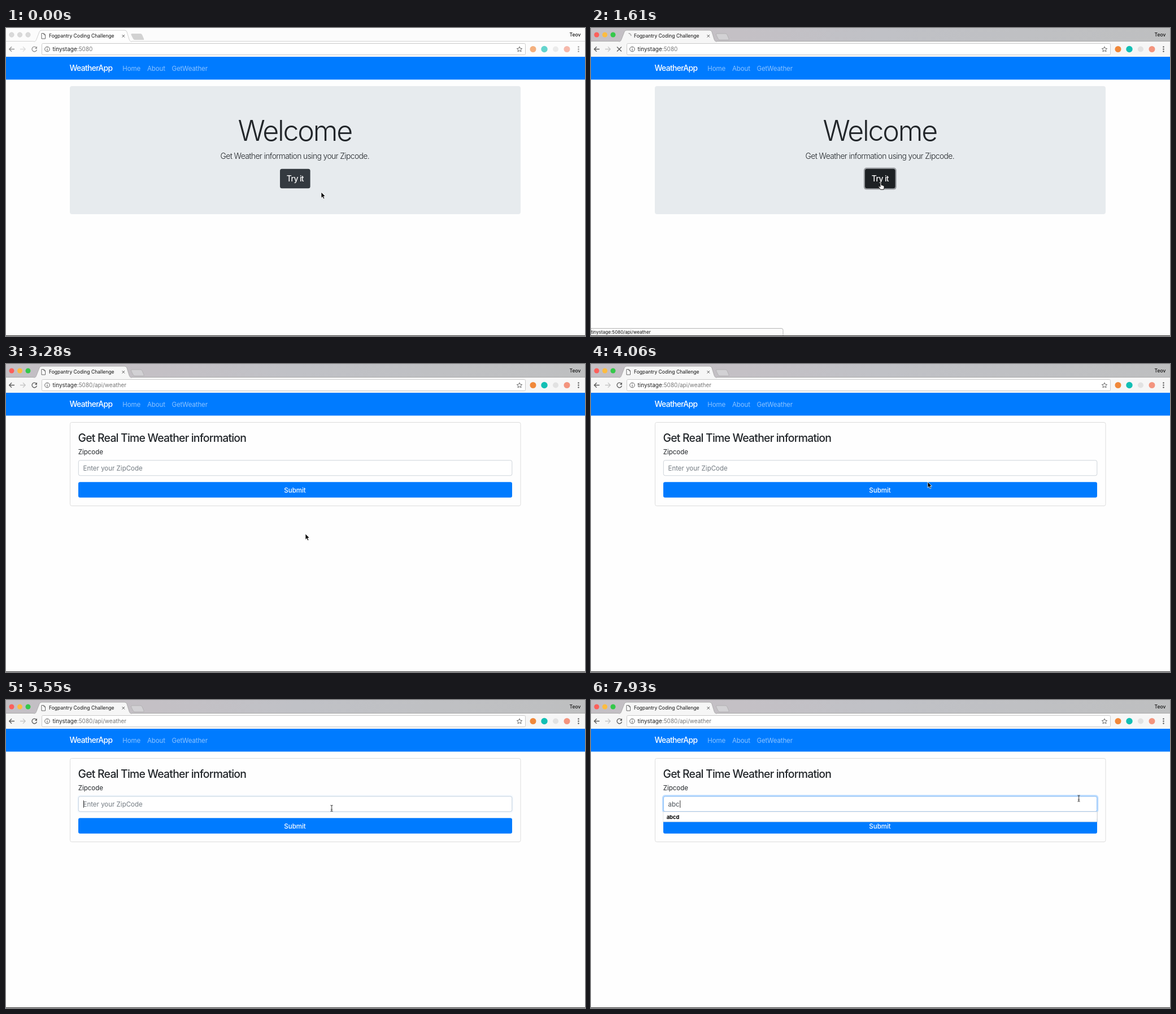
Animation of 1025 by 546 pixels, one loop 8000 ms. Source, as an HTML page:

```html
<!DOCTYPE html>
<html lang="en">
<head>
<meta charset="utf-8">
<title>Weather form demo</title>
<style>
html, body { margin: 0; width: 100%; height: 100%; overflow: hidden; background: #fefefe; }
svg { display: block; width: 100vw; height: 100vh; }
text { font-family: Inter, "Open Sans", sans-serif; font-size: 11.5px; font-optical-sizing: none; fill: #212529; }
.tight { letter-spacing: -.043em; }
.ui { font-size: 8.55px; fill: #111; }
.url { font-size: 10px; fill: #222; }
.dim { fill: #777; }
.nav { fill: #fff; fill-opacity: .55; letter-spacing: -.01em; }
.line { fill: none; stroke: #5a5a5a; stroke-width: 1.3; }

/* Every part follows one 8 s clock with hard steps. */
.s { animation: 8s step-end infinite; }
.idle { animation-name: idle; }
.live { animation-name: live; }
.tools { animation-name: tools; }
.first { animation-name: first; }
.second { animation-name: second; }
.busy { animation-name: busy; }
.calm { animation-name: calm; }
.spin { animation-name: spin; }
.try { animation-name: try; }
.status { animation-name: status; }
.fading { animation-name: fading; }
.badge { animation-name: badge; }
.submit { animation-name: submit; }
.focus { animation-name: focus; }
.hint { animation-name: hint; }
.ka { animation-name: ka; }
.kb { animation-name: kb; }
.kc { animation-name: kc; }
.caret { animation-name: caret; }
.popup { animation-name: popup; }
.menu { animation-name: menu; }
.pointer { animation-name: pointer; }
.arrow { animation-name: arrow; }
.hand { animation-name: hand; }
.beam { animation-name: beam; }

@keyframes idle { 0% { opacity: 1 } 8.125%, 100% { opacity: 0 } }
@keyframes live { 0% { opacity: 0 } 8.125%, 100% { opacity: 1 } }
@keyframes tools { 0% { opacity: .65 } 8.125%, 100% { opacity: 1 } }
@keyframes first { 0% { opacity: 1 } 21.875%, 100% { opacity: 0 } }
@keyframes second { 0% { opacity: 0 } 21.875%, 100% { opacity: 1 } }
@keyframes busy { 0% { opacity: 0 } 17.5% { opacity: 1 } 21.875%, 100% { opacity: 0 } }
@keyframes calm { 0% { opacity: 1 } 17.5% { opacity: 0 } 21.875%, 100% { opacity: 1 } }
@keyframes spin { 0% { transform: rotate(120deg) } 20.125%, 100% { transform: rotate(0deg) } }
@keyframes try { 0% { fill: #343a40 } 8.125% { fill: #23272b } 17.5%, 100% { fill: #1d2124 } }
@keyframes status { 0% { opacity: 0 } 8.125% { opacity: 1 } 21.875%, 100% { opacity: 0 } }
@keyframes fading { 0% { opacity: 0 } 21.875% { opacity: 1 } 23.75%, 100% { opacity: 0 } }
@keyframes badge { 0% { fill: #e2e2e2 } 21.875% { fill: #999 } 23.75%, 100% { fill: #e2e2e2 } }
@keyframes submit { 0% { fill: #007bff } 52.625% { fill: #0069d9 } 54.5%, 100% { fill: #007bff } }
@keyframes focus { 0% { opacity: 0 } 69.375% { opacity: .15 } 71.25%, 100% { opacity: 1 } }
@keyframes hint { 0% { opacity: 1 } 91.625%, 100% { opacity: 0 } }
@keyframes ka { 0% { fill-opacity: 0 } 91.625%, 100% { fill-opacity: 1 } }
@keyframes kb { 0% { fill-opacity: 0 } 93.5%, 100% { fill-opacity: 1 } }
@keyframes kc { 0% { fill-opacity: 0 } 99.125%, 100% { fill-opacity: 1 } }
@keyframes caret {
  0% { opacity: 0; transform: translate(137px, 178px) }
  69.375% { opacity: 1; transform: translate(137px, 178px) }
  76.875% { opacity: 0; transform: translate(137px, 178px) }
  82.375% { opacity: 1; transform: translate(137px, 178px) }
  88% { opacity: 0; transform: translate(137px, 178px) }
  91.625% { opacity: 1; transform: translate(143.5px, 178px) }
  93.5% { opacity: 1; transform: translate(150.5px, 178px) }
  99.125%, 100% { opacity: 1; transform: translate(157.3px, 178px) }
}
@keyframes popup { 0% { opacity: 0 } 91.625%, 100% { opacity: 1 } }
@keyframes menu { 0% { transform: scaleY(3) } 93.5%, 100% { transform: scaleY(1) } }
@keyframes pointer {
  0% { transform: translate(558px, 291px) }
  1.75% { transform: translate(530px, 281px) }
  4.375% { transform: translate(511px, 274px) }
  8.125% { transform: translate(512px, 274px) }
  41% { transform: translate(530px, 301px) }
  42.875% { transform: translate(548px, 317px) }
  44.75% { transform: translate(562px, 316px) }
  46.625% { transform: translate(575px, 298px) }
  48.875% { transform: translate(588px, 254px) }
  50.75% { transform: translate(596px, 209px) }
  52.625% { transform: translate(593px, 201px) }
  54.5% { transform: translate(586px, 194px) }
  56.25% { transform: translate(579px, 192.5px) }
  58.125% { transform: translate(576.5px, 192px) }
  73.125% { transform: translate(660px, 186px) }
  75% { transform: translate(800px, 178px) }
  76.875%, 100% { transform: translate(863.5px, 174.5px) }
}
@keyframes arrow { 0% { opacity: 1 } 8.125% { opacity: 0 } 41% { opacity: 1 } 54.5%, 100% { opacity: 0 } }
@keyframes hand { 0% { opacity: 0 } 8.125% { opacity: 1 } 41%, 100% { opacity: 0 } }
@keyframes beam { 0% { opacity: 0 } 54.5%, 100% { opacity: 1 } }
</style>
</head>
<body>
<svg viewBox="0 0 1025 546" preserveAspectRatio="none">
  <defs>
    <linearGradient id="strip">
      <stop offset="0" stop-color="#c3bfc4"/>
      <stop offset=".25" stop-color="#c4c0c5"/>
      <stop offset=".5" stop-color="#c0c1c6"/>
      <stop offset="1" stop-color="#bebfc0"/>
    </linearGradient>
    <path id="tab" d="M49 24C53 24 53 22 54 20L59 7Q60 4 63 4H210Q213 4 214 7L218 20C219 22 219 24 223 24"/>
    <path id="plus" d="M223 10H238Q240 10 241 12L244 19Q245 21 243 21H228Q226 21 225 19L221.500 12Q221 10 223 10Z"/>
  </defs>

  <rect width="1025" height="546" fill="#fefefe"/>

  <!-- Tab strip -->
  <g class="s idle">
    <rect width="1025" height="51" fill="#fcfcfc"/>
    <path d="M0 23.500H49M223 23.500H1025" stroke="#d5d5d5"/>
    <use href="#tab" fill="#fefefe" stroke="#c4c4c4" stroke-width=".8"/>
    <use href="#plus" fill="#d2d2d2"/>
    <g fill="#dadada" stroke="#cdcdcd" stroke-width=".6">
      <circle cx="10" cy="12" r="4.200"/><circle cx="24.500" cy="12" r="4.200"/><circle cx="39" cy="12" r="4.200"/>
    </g>
  </g>
  <g class="s live">
    <rect width="1025" height="24" fill="url(#strip)"/>
    <rect y="24" width="1025" height="27" fill="#f6f6f6"/>
    <path d="M0 23.500H49M223 23.500H1025" stroke="#aaa"/>
    <use href="#tab" fill="#f6f6f6" stroke="#a3a3a3" stroke-width=".8"/>
    <use href="#plus" fill="#d2d1d4" stroke="#aaa" stroke-width=".7"/>
    <circle cx="10" cy="12" r="4.500" fill="#fc605b"/>
    <circle cx="24.500" cy="12" r="4.500" fill="#fdbc40"/>
    <circle cx="39" cy="12" r="4.500" fill="#34c84a"/>
  </g>
  <path class="s calm" d="M63 9.500H67L69.500 12V19H63ZM67 9.500V12H69.500" fill="#fff" stroke="#555" stroke-width=".9"/>
  <g class="s busy"><g transform="translate(66.500 14)">
    <path class="s spin" d="M0 -4.500A4.500 4.500 0 0 1 4.500 0" fill="none" stroke="#888" stroke-width="1.100"/>
  </g></g>
  <text class="ui" x="76" y="17.300">Fogpantry Coding Challenge</text>
  <path d="M205.500 12L210 16.500M210 12L205.500 16.500" stroke="#555"/>
  <text class="ui" x="997.500" y="15.300" font-weight="500">Teov</text>

  <!-- Toolbar -->
  <g class="s tools">
    <path class="line" d="M15 37.500H6M10 33.200L5.700 37.500L10 41.800"/>
    <path class="line" d="M25 37.500H34M30 33.200L34.300 37.500L30 41.800" opacity=".3"/>
    <g class="s calm">
      <path class="line" d="M53.600 34.700A4.300 4.300 0 1 0 54.500 38.500"/>
      <path d="M55 32.500V36.700H50.800Z" fill="#5a5a5a"/>
    </g>
    <path class="line s busy" d="M46 33.500L54 41.500M54 33.500L46 41.500"/>
  </g>
  <rect x="63.500" y="27.500" width="856" height="20" rx="2" fill="#fff" stroke="#cacaca"/>
  <circle class="line" cx="73" cy="37.500" r="4.300" style="stroke-width:1"/>
  <path d="M73 37V40.200M73 34.800V36" stroke="#5a5a5a" stroke-width="1.100"/>
  <text class="url" x="82.500" y="41.200">tinystage<tspan class="dim">:5080</tspan><tspan class="dim s second-path">/api/weather</tspan></text>
  <path class="line" d="M909 33L910.400 36.100L913.700 36.400L911.200 38.600L912 41.900L909 40.100L906 41.900L906.800 38.600L904.300 36.400L907.600 36.100Z" style="stroke-width:.9"/>
  <g class="s tools">
    <circle cx="933" cy="37.500" r="5.500" fill="#f0883a"/>
    <circle cx="953" cy="37.500" r="5.700" fill="#12bfb4"/>
    <circle class="s badge" cx="973" cy="37.500" r="5"/>
    <circle cx="993" cy="37.500" r="5.500" fill="#f3947e"/>
    <g fill="#5a5a5a">
      <circle cx="1013.500" cy="33.500" r="1.200"/><circle cx="1013.500" cy="37.500" r="1.200"/><circle cx="1013.500" cy="41.500" r="1.200"/>
    </g>
  </g>

  <!-- Page header -->
  <rect y="51" width="1025" height="40.500" fill="#007bff"/>
  <text class="tight" x="112.500" y="76.300" font-weight="500" style="font-size:13.9px;fill:#fff;letter-spacing:-.048em">WeatherApp</text>
  <text class="nav" x="206.300" y="75.600">Home</text>
  <text class="nav" x="250" y="75.600">About</text>
  <text class="nav" x="293.500" y="75.600">GetWeather</text>

  <!-- Welcome page -->
  <g class="s first">
    <rect x="113" y="103" width="798" height="227" rx="4" fill="#e7ebee"/>
    <text class="tight" x="410.500" y="199.500" font-weight="300" style="font-size:50px">Welcome</text>
    <text class="tight" x="379.500" y="232.300" font-weight="300" style="font-size:13.9px">Get Weather information using your Zipcode.</text>
    <rect class="s busy" x="482.800" y="247.600" width="58" height="39" rx="5" fill="#999ca0"/>
    <rect class="s try" x="485" y="249.800" width="53.600" height="34.400" rx="3.500"/>
    <text class="tight" x="496.800" y="272" font-weight="500" style="font-size:13.9px;fill:#fff">Try it</text>
  </g>

  <!-- Form page -->
  <g class="s second">
    <rect x="113.500" y="103.500" width="797.500" height="148" rx="3" fill="#fefefe" stroke="#dcdcdc"/>
    <text class="tight" x="127.500" y="137.600" font-weight="500" style="font-size:19.400px;letter-spacing:-.04em">Get Real Time Weather information</text>
    <text x="127.700" y="160.300">Zipcode</text>
    <rect x="128.300" y="170.800" width="767.500" height="27" rx="3" fill="#fff" stroke="#ced4da"/>
    <g class="s focus" fill="none">
      <rect x="127" y="169.300" width="770.200" height="30" rx="4" stroke="#bfdeff" stroke-width="2.200"/>
      <rect x="128.300" y="170.800" width="767.500" height="27" rx="3" stroke="#80bdff"/>
    </g>
    <text class="s hint" x="136.500" y="188.600" style="fill:#737b82">Enter your ZipCode</text>
    <text x="136.500" y="188.600" style="fill:#495057"><tspan class="s ka">a</tspan><tspan class="s kb">b</tspan><tspan class="s kc">c</tspan></text>
    <rect class="s caret" width="1" height="13" fill="#333"/>
    <rect class="s submit" x="128" y="209.300" width="768" height="27.400" rx="3"/>
    <text x="492.300" y="227.500" font-weight="500" style="fill:#fff">Submit</text>
    <g class="s popup">
      <g transform="translate(127.500 198)">
        <rect class="s menu" width="768.500" height="18" fill="#fff" stroke="#c9cdd2" stroke-width=".7"/>
      </g>
      <text x="133.700" y="211.200" font-weight="700" style="font-size:9.300px;fill:#000">abcd</text>
    </g>
  </g>

  <!-- Status bubble -->
  <g class="s status">
    <path d="M0 532.500H337Q340 532.500 340 535.500V545.500H0Z" fill="#fbfbfb" stroke="#b5b5b5"/>
    <text class="ui" x="0" y="542" style="font-size:8.100px">tinystage:5080/api/weather</text>
  </g>
  <text class="ui s fading" x="0" y="542" style="font-size:8.100px;fill:#dcdcdc">tinystage:5080/api/weather</text>
  <rect y="545" width="1025" height="1" fill="#2b2b2b"/>

  <!-- Mouse pointer -->
  <g class="s pointer">
    <path class="s arrow" d="M0 0V10.400L2.400 8.200L4 12L5.900 11.200L4.300 7.500H7.400Z" fill="#000" stroke="#fff" stroke-width=".8"/>
    <path class="s hand" d="M0 1.200Q0 0 1 0T2 1.200V4.600Q3.500 4 4 5.200Q5.200 4.700 5.600 5.800Q7 5.600 7 7V9Q6.500 10.500 6 12.500H.6Q-.5 10.500 -2.600 8.300Q-3.400 6.900 -2.200 6.600Q-1.200 6.600 0 8Z" fill="#fff" stroke="#111" stroke-width=".9"/>
    <path class="s beam" d="M-2 -5.500Q0 -5.500 0 -4Q0 -5.500 2 -5.500M0 -4V4M-2 5.500Q0 5.500 0 4Q0 5.500 2 5.500M-1.300 2H1.300" fill="none" stroke="#222"/>
  </g>
</svg>
<style>
.second-path { animation-name: path; }
@keyframes path { 0% { fill-opacity: 0 } 21.875%, 100% { fill-opacity: 1 } }
</style>
</body>
</html>
```
